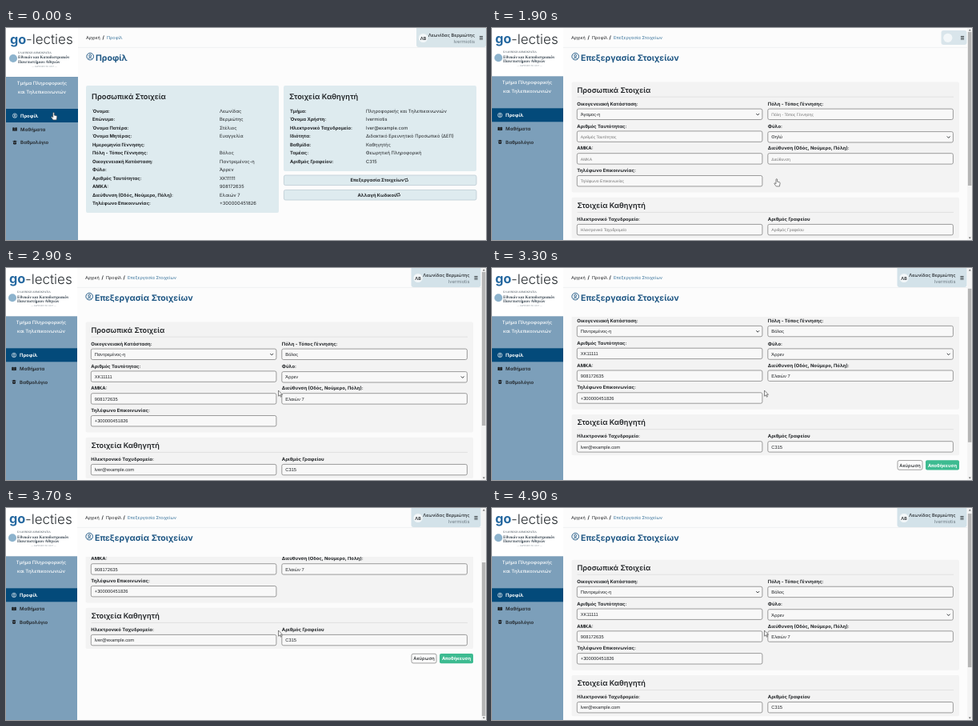
Recreate the animation shown at these times as an HTML page. Size 600 px wide and 265 px high, loop 5 s.

```html
<!DOCTYPE html>
<html lang="el">
<head>
<meta charset="utf-8">
<title>go-lecties</title>
<style>
  html, body { margin: 0; width: 100%; height: 100%; overflow: hidden; background: #fcfcfc; }
  svg { display: block; width: 600px; height: 265px; }
  text { font-family: Inter, "Open Sans", sans-serif; white-space: pre; text-rendering: geometricPrecision; }
  .input { font-family: "Liberation Sans", Arial, sans-serif; }
  .serif { font-family: "Liberation Serif", "Noto Serif", serif; }
</style>
</head>
<body>
<svg id="stage" viewBox="0 0 600 265" xmlns="http://www.w3.org/2000/svg"></svg>
<script>
const LOOP = 5000, STEP = 100;
const GREY_AT = 1300, EDIT_AT = 1900, LOADED_AT = 2300;
const MAX_SCROLL = 87;
const INK = '#1f2225', BLUE = '#1f5784', LINK = '#3b759d';

const person = {
  first: 'Λεωνίδας', last: 'Βερμιώτης', initials: 'ΛΒ', user: 'lvermiotis',
  father: 'Στέλιος', mother: 'Ευαγγελία', id: 'XK11111', amka: '908172635',
  street: 'Ελαιών 7', phone: '+300000451826', mail: 'lver@example.com', office: 'C315'
};

// Drawing helpers; text is placed by its visual middle.
const text = (x, mid, str, size = 5.8, { w = 400, fill = INK, anchor = 'start', cls = '' } = {}) =>
  `<text x="${x}" y="${mid + size * 0.36}" font-size="${size}" font-weight="${w}" fill="${fill}" text-anchor="${anchor}" class="${cls}">${str}</text>`;
const rect = (x, y, w, h, fill, r = 0, extra = '') =>
  `<rect x="${x}" y="${y}" width="${w}" height="${h}" rx="${r}" fill="${fill}" ${extra}/>`;
const line = (x1, y, x2, color, w = 0.8) =>
  `<path d="M${x1} ${y}H${x2}" stroke="${color}" stroke-width="${w}"/>`;
const group = (id, body) => `<g id="${id}">${body}</g>`;
const bold = (x, mid, str, size = 5.8, fill = INK) => text(x, mid, str, size, { w: 700, fill });

const userIcon = (x, y, r, color) =>
  `<g transform="translate(${x} ${y}) scale(${r})" fill="none" stroke="${color}" stroke-width=".2">
    <circle r=".9"/><circle cy="-.2" r=".3"/><path d="M-.55 .65Q0 -.05 .55 .65"/></g>`;

const refreshIcon = (x, y) =>
  `<path transform="translate(${x} ${y})" d="M-2 .3V-1.4H1.4M.5 -2.3L1.5 -1.4L.5 -.5M2 -.3V1.4H-1.4M-.5 .5L-1.5 1.4L-.5 2.3" fill="none" stroke="${INK}" stroke-width=".75"/>`;

const menuIcon = x => [10.5, 12.3, 14.1].map(y => line(x - 2.1, y, x + 2.1, INK)).join('');

function sidebar() {
  const centre = { w: 500, fill: '#fff', anchor: 'middle' };
  const serif = { cls: 'serif', fill: '#3d4a55' };
  return rect(0, 0, 90, 61, '#fff') +
    text(5, 14.3, 'go', 16.3, { w: 700, fill: '#2568a0' }) +
    text(25, 14.3, '-lecties', 17, { w: 300, fill: '#2a2f33' }) +
    '<circle cx="9" cy="38" r="5" fill="#8db3cd"/>' +
    text(15, 30.8, 'ΕΛΛΗΝΙΚΗ ΔΗΜΟΚΡΑΤΙΑ', 3.5, serif) +
    text(15, 36.5, 'Εθνικόν και Καποδιστριακόν', 5.2, { ...serif, w: 700 }) +
    text(15, 42.3, 'Πανεπιστήμιον Αθηνών', 5.2, { ...serif, w: 700 }) +
    text(48, 47.6, '— ΙΔΡΥΘΕΝ ΤΟ 1837 —', 3, { ...serif, anchor: 'middle', fill: '#8a949c' }) +
    rect(0, 61, 90, 206, '#7c9fba') +
    text(45, 68.9, 'Τμήμα Πληροφορικής', 5.9, centre) +
    text(45, 79.8, 'και Τηλεπικοινωνιών', 5.9, centre) +
    rect(0, 101, 90, 17, '#034a7a') +
    userIcon(11, 109.6, 3, '#fff') + bold(18, 109.6, 'Προφίλ', 5.9, '#fff') +
    `<path d="M8.2 124.6Q9.8 124 10.8 124.8V129Q9.8 128.3 8.2 128.8ZM13.8 124.6Q12.2 124 11.2 124.8V129Q12.2 128.3 13.8 128.8Z" fill="${INK}"/>` +
    text(18, 126.6, 'Μαθήματα', 5.9, { w: 600 }) +
    `<path d="M8 141.7L11 140.4L14 141.7L11 143Z M9 142.8L11 143.7L13 142.8V145Q11 146.2 9 145Z" fill="${INK}"/>` +
    text(18, 143.1, 'Βαθμολόγιο', 5.9, { w: 600 });
}

function crumbs(x, names, gaps) {
  return names.map((name, i) => {
    const last = i === names.length - 1;
    const out = text(x, 11.7, name, 5.45, { fill: last ? LINK : INK }) +
      (last ? '' : bold(x + gaps[i] - 5.5, 11.5, '/', 6));
    x += gaps[i] || 0;
    return out;
  }).join('');
}

// Account box; `right` is its right edge.
function account(right, id) {
  return rect(right - 87, -3, 87, 27, '#d3e2e9', 3, `id="${id}"`) +
    `<circle cx="${right - 78.5}" cy="12.5" r="5.6" fill="#f3f7f9"/>` +
    text(right - 78.5, 12.6, person.initials, 5.4, { w: 600, anchor: 'middle' }) +
    text(right - 14, 8.9, `${person.first} ${person.last}`, 5.7, { w: 500, anchor: 'end' }) +
    text(right - 14, 17, person.user, 5.8, { fill: '#6b7880', anchor: 'end' }) +
    menuIcon(right - 6);
}

function listCard(x, w, h, title, valueX, rows) {
  return rect(x, 72, w, h, '#deebef', 2, 'class="tint"') + text(x + 7, 86, title, 9.3, { w: 600 }) +
    rows.map(([label, value], i) => {
      const y = 103.5 + i * 10.53;
      return bold(x + 8, y, label) + text(valueX, y, value);
    }).join('');
}

function wideButton(y, label, iconX) {
  return rect(347.4, y, 240.6, 12.6, '#deebef', 2, 'class="tintFlat" stroke="#bccbd3" stroke-width=".8"') +
    text(464, y + 6.4, label, 5.75, { w: 700, anchor: 'middle' }) + refreshIcon(iconX, y + 6);
}

function profilePage() {
  return line(90, 24.4, 600, '#ebedee', 0.7) +
    crumbs(100, ['Αρχική', 'Προφίλ'], [26]) + account(600, 'accountA') +
    userIcon(105.2, 35.6, 4.8, BLUE) + bold(112, 36.8, 'Προφίλ', 10.5, BLUE) +
    listCard(100, 241, 159, 'Προσωπικά Στοιχεία', 267, [
      ['Όνομα:', person.first], ['Επώνυμο:', person.last],
      ['Όνομα Πατέρα:', person.father], ['Όνομα Μητέρας:', person.mother],
      ['Ημερομηνία Γέννησης:', ''], ['Πόλη - Τόπος Γέννησης:', 'Βόλος'],
      ['Οικογενειακή Κατάσταση:', 'Παντρεμένος-η'], ['Φύλο:', 'Άρρεν'],
      ['Αριθμός Ταυτότητας:', person.id], ['ΑΜΚΑ:', person.amka],
      ['Διεύθυνση (Οδός, Νούμερο, Πόλη):', person.street],
      ['Τηλέφωνο Επικοινωνίας:', person.phone]
    ]) +
    listCard(347, 241, 107, 'Στοιχεία Καθηγητή', 450, [
      ['Τμήμα:', 'Πληροφορικής και Τηλεπικοινωνιών'], ['Όνομα Χρήστη:', person.user],
      ['Ηλεκτρονικό Ταχυδρομείο:', person.mail],
      ['Ιδιότητα:', 'Διδακτικό Ερευνητικό Προσωπικό (ΔΕΠ)'],
      ['Βαθμίδα:', 'Καθηγητής'], ['Τομέας:', 'Θεωρητική Πληροφορική'],
      ['Αριθμός Γραφείου:', person.office]
    ]) +
    wideButton(184, 'Επεξεργασία Στοιχείων', 500.5) + wideButton(202.4, 'Αλλαγή Κωδικού', 490.5);
}

// Column, label middle, label, empty state, loaded value, is it a select
const rowY = i => 94.7 + i * 27.8;
const fields = [
  [0, rowY(0), 'Οικογενειακή Κατάσταση:', 'Άγαμος-η', 'Παντρεμένος-η', true],
  [1, rowY(0), 'Πόλη - Τόπος Γέννησης:', 'Πόλη - Τόπος Γέννησης', 'Βόλος'],
  [0, rowY(1), 'Αριθμός Ταυτότητας:', 'Αριθμός Ταυτότητας', person.id],
  [1, rowY(1) + 0.7, 'Φύλο:', 'Θηλύ', 'Άρρεν', true],
  [0, rowY(2), 'ΑΜΚΑ:', 'ΑΜΚΑ', person.amka],
  [1, rowY(2), 'Διεύθυνση (Οδός, Νούμερο, Πόλη):', 'Διεύθυνση', person.street],
  [0, rowY(3), 'Τηλέφωνο Επικοινωνίας:', 'Τηλέφωνο Επικοινωνίας', person.phone],
  [0, 239, 'Ηλεκτρονικό Ταχυδρομείο:', 'Ηλεκτρονικό Ταχυδρομείο', person.mail],
  [1, 239, 'Αριθμός Γραφείου', 'Αριθμός Γραφείου', person.office]
];

function field([col, y, label, empty, value, select]) {
  const x = col ? 344.8 : 106.3, mid = y + 13;
  const blank = select
    ? text(x + 4.5, mid + 0.2, empty, 5.75, { cls: 'input' })
    : text(x + 4.5, mid + 0.4, empty, 5.05, { cls: 'input', fill: '#757575' });
  return bold(x, y, label, 5.85) +
    rect(x, mid - 6.6, 231.6, 13.4, '#f8f8f8', 2, 'stroke="#858585" stroke-width=".8"') +
    (select ? `<path d="M${x + 224} ${mid - 0.7}l1.9 1.9l1.9 -1.9" fill="none" stroke="${INK}" stroke-width=".9"/>` : '') +
    `<g class="blank">${blank}</g><g class="filled">${text(x + 4.5, mid + 0.2, value, 5.75, { cls: 'input' })}</g>`;
}

function formCard(y, h, title) {
  return rect(99.5, y, 484.5, h, '#f3f3f3', 2) + text(106.5, y + 9.8, title, 9.2, { w: 600 }) +
    line(106.5, y + 18.6, 577, '#dadada', 0.7);
}

function form() {
  return formCard(67.5, 138, 'Προσωπικά Στοιχεία') + formCard(211.8, 51.2, 'Στοιχεία Καθηγητή') +
    fields.map(field).join('') +
    rect(507, 269.3, 31, 11.6, '#fdfdfd', 2, 'stroke="#777" stroke-width=".7"') +
    text(522.5, 275.2, 'Ακύρωση', 5.8, { w: 500, anchor: 'middle' }) +
    rect(542, 269, 42, 12.2, '#3dbb91', 2) +
    text(563, 275.2, 'Αποθήκευση', 5.8, { w: 700, fill: '#fff', anchor: 'middle' });
}

function editPage() {
  return line(89, 24.4, 594, '#ebedee', 0.7) +
    crumbs(99, ['Αρχική', 'Προφίλ', 'Επεξεργασία Στοιχείων'], [26, 27]) +
    group('accountEmpty', rect(561.5, 3, 32, 18, '#d9e5eb', 3) +
      '<circle cx="569.8" cy="12.3" r="5.6" fill="#f3f7f9"/>' + menuIcon(588)) +
    group('accountFull', account(593.5, 'accountB')) +
    userIcon(104.2, 35.6, 4.8, BLUE) + bold(111, 36.8, 'Επεξεργασία Στοιχείων', 10.5, BLUE) +
    `<g clip-path="url(#view)">${group('form', form())}</g>` +
    rect(594.3, 0, 5.7, 265, '#f3f3f3') +
    '<path d="M595.8 3.4L597.3 1.6L598.8 3.4ZM595.8 261.6L597.3 263.4L598.8 261.6Z" fill="#666"/>' +
    rect(594.9, 5, 4.5, 192, '#b5b5b5', 0, 'id="thumb"');
}

const stroke = 'fill="#fff" stroke="#444" stroke-width=".65" stroke-linejoin="round"';
const cursors =
  group('arrow', `<path d="M0 0V7.2L1.7 5.7L2.8 8.2L4 7.7L2.8 5.3H5Z" ${stroke}/>`) +
  group('hand', `<path d="M-.8 .6Q0 -.5 .8 .6V3.6L3.7 4.3Q4.4 4.6 4.3 5.4L3.6 9.4H-.6L-2.9 6.2Q-2.9 5 -1.8 5.4L-.8 6.2Z" ${stroke}/>`);

const stage = document.getElementById('stage');
stage.innerHTML =
  `<defs><clipPath id="view"><rect x="89" y="61" width="505" height="204"/></clipPath>
   <linearGradient id="fade" x1="0" y1="0" x2="0" y2="1">
     <stop offset="0" stop-color="#ebebeb"/><stop offset=".3" stop-color="#e8ebec"/><stop offset="1" stop-color="#deebef"/>
   </linearGradient></defs>` +
  rect(0, 0, 600, 265, '#fcfcfc') + group('side', sidebar()) +
  group('profile', profilePage()) + group('edit', editPage()) + cursors;

const el = id => document.getElementById(id);
const all = sel => [...stage.querySelectorAll(sel)];
const tints = all('.tint'), flats = all('.tintFlat'), blanks = all('.blank'), filled = all('.filled');
const show = (node, on) => node.setAttribute('display', on ? 'inline' : 'none');
const move = (node, x, y) => node.setAttribute('transform', `translate(${x} ${y})`);

const ease = (t, from, to) => {
  const k = Math.min(1, Math.max(0, (t - from) / (to - from)));
  return k * k * (3 - 2 * k);
};
const scrollAt = t => MAX_SCROLL * (ease(t, 3050, 3700) - ease(t, 4376, 4964));

// time, x, y of the pointer tip
const path = [[0, 59.5, 105.5], [600, 59.5, 105.5], [900, 130, 122], [1200, 250, 157],
  [1300, 297.5, 172.5], [1500, 355.8, 188.5], [2400, 355.8, 188.5], [2900, 340.5, 153], [LOOP, 340.5, 153]];

function pointerAt(t) {
  const i = path.findIndex(p => p[0] > t);
  const [t0, x0, y0] = path[i - 1], [t1, x1, y1] = path[i];
  const k = (t - t0) / (t1 - t0);
  return [x0 + (x1 - x0) * k, y0 + (y1 - y0) * k];
}

function draw(t) {
  const edit = t >= EDIT_AT, loaded = t >= LOADED_AT, grey = t >= GREY_AT;
  show(el('profile'), !edit);
  show(el('edit'), edit);
  // The scrollbar narrows the page, which nudges the sidebar.
  move(el('side'), edit ? -1 : 0, edit ? -0.7 : 0);
  tints.forEach(n => n.setAttribute('fill', grey ? 'url(#fade)' : '#deebef'));
  flats.forEach(n => n.setAttribute('fill', grey ? '#ebecec' : '#deebef'));
  el('accountA').setAttribute('fill', grey ? '#e3e6e7' : '#d8e5ea');
  show(el('accountEmpty'), !loaded);
  show(el('accountFull'), loaded);
  blanks.forEach(n => show(n, !loaded));
  filled.forEach(n => show(n, loaded));

  const scroll = scrollAt(t);
  move(el('form'), 0, -scroll);
  el('thumb').setAttribute('y', 5 + scroll * 63 / MAX_SCROLL);

  const [x, y] = pointerAt(t);
  const hand = x < 88 || (t >= 1500 && t <= 2400);
  show(el('hand'), hand);
  show(el('arrow'), !hand);
  move(el(hand ? 'hand' : 'arrow'), x, y);
}

const start = performance.now();
function tick() {
  const t = (performance.now() - start) % LOOP;
  draw(Math.floor(t / STEP) * STEP);
  requestAnimationFrame(tick);
}
tick();
</script>
</body>
</html>
```
